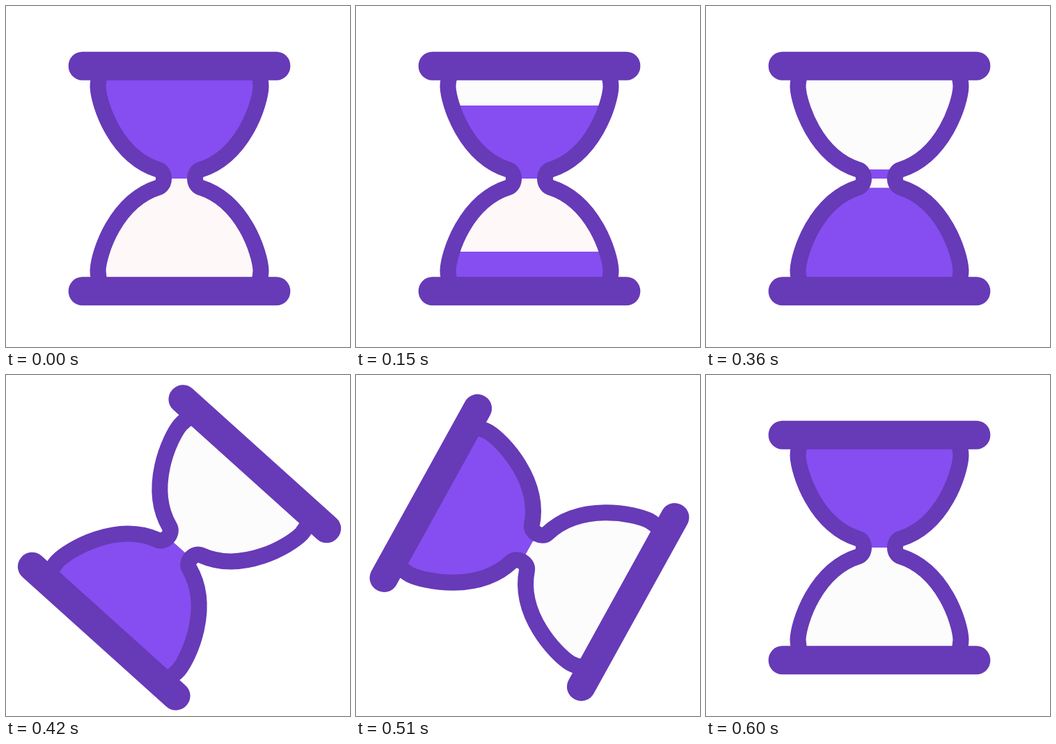
An HTML page for the animation above (0.72 s loop, 494 px wide and 490 px high).

```html
<!DOCTYPE html>
<html lang="en">
<head>
<meta charset="utf-8">
<title>Hourglass</title>
<style>
  html, body { margin: 0; width: 100%; height: 100%; overflow: hidden; background: #fff; }
  svg { display: block; width: 494px; height: 490px; }
</style>
</head>
<body>
<svg viewBox="-249 -248 494 490">
  <defs>
    <!-- One quarter of the glass wall, mirrored for the rest -->
    <path id="wall" d="M-113-152Q-117-142-117-132C-116-108-92.2-32.2-30-12.6C-25.5-11-22.5-6-22.5 0V1"/>
    <path id="quarter" d="M-113-152Q-117-142-117-132C-116-108-92.2-32.2-30-12.6C-25.5-11-22.5-6-22.5 0H1V-152Z"/>
    <clipPath id="glass">
      <use href="#quarter"/>
      <use href="#quarter" transform="scale(-1 1)"/>
      <use href="#quarter" transform="scale(1 -1)"/>
      <use href="#quarter" transform="scale(-1)"/>
    </clipPath>
  </defs>
  <g id="hourglass">
    <g clip-path="url(#glass)">
      <rect x="-120" y="-144" width="240" height="144" fill="#fdfcfc"/>
      <rect x="-120" width="240" height="144" fill="#fff8f8"/>
      <g fill="#864df0">
        <rect id="upper" x="-120" width="240"/>
        <rect id="lower" x="-120" width="240"/>
      </g>
    </g>
    <g fill="none" stroke="#673ab7" stroke-width="23">
      <use href="#wall"/>
      <use href="#wall" transform="scale(-1 1)"/>
      <use href="#wall" transform="scale(1 -1)"/>
      <use href="#wall" transform="scale(-1)"/>
    </g>
    <g fill="#673ab7">
      <rect x="-159.3" y="-182.3" width="318.6" height="41" rx="20"/>
      <rect x="-159.3" y="141.3" width="318.6" height="41" rx="20"/>
    </g>
  </g>
</svg>
<script>
const LOOP = 720, STEP = 30, LAST_STEP = 20, TURN_START = 12, HEIGHT = 142;
const TURN = [0, 17, 42, 68.3, 93, 118.9, 148, 173, 180];
const [hourglass, upper, lower] =
  ['hourglass', 'upper', 'lower'].map(id => document.getElementById(id));

function setLevel(rect, top, height) {
  rect.setAttribute('y', top);
  rect.setAttribute('height', height);
}

function draw(now) {
  const step = Math.min(Math.floor(now % LOOP / STEP), LAST_STEP);
  // The sand speeds up as the bulb narrows
  const drained = Math.min(6.7 * step + 0.028 * step ** 3, HEIGHT);
  setLevel(upper, drained - HEIGHT, HEIGHT - drained);
  setLevel(lower, HEIGHT - drained, drained);
  hourglass.setAttribute('transform', `rotate(${TURN[Math.max(step - TURN_START, 0)]})`);
}

const start = performance.now();
function tick() {
  draw(performance.now() - start);
  requestAnimationFrame(tick);
}
tick();
</script>
</body>
</html>
```
